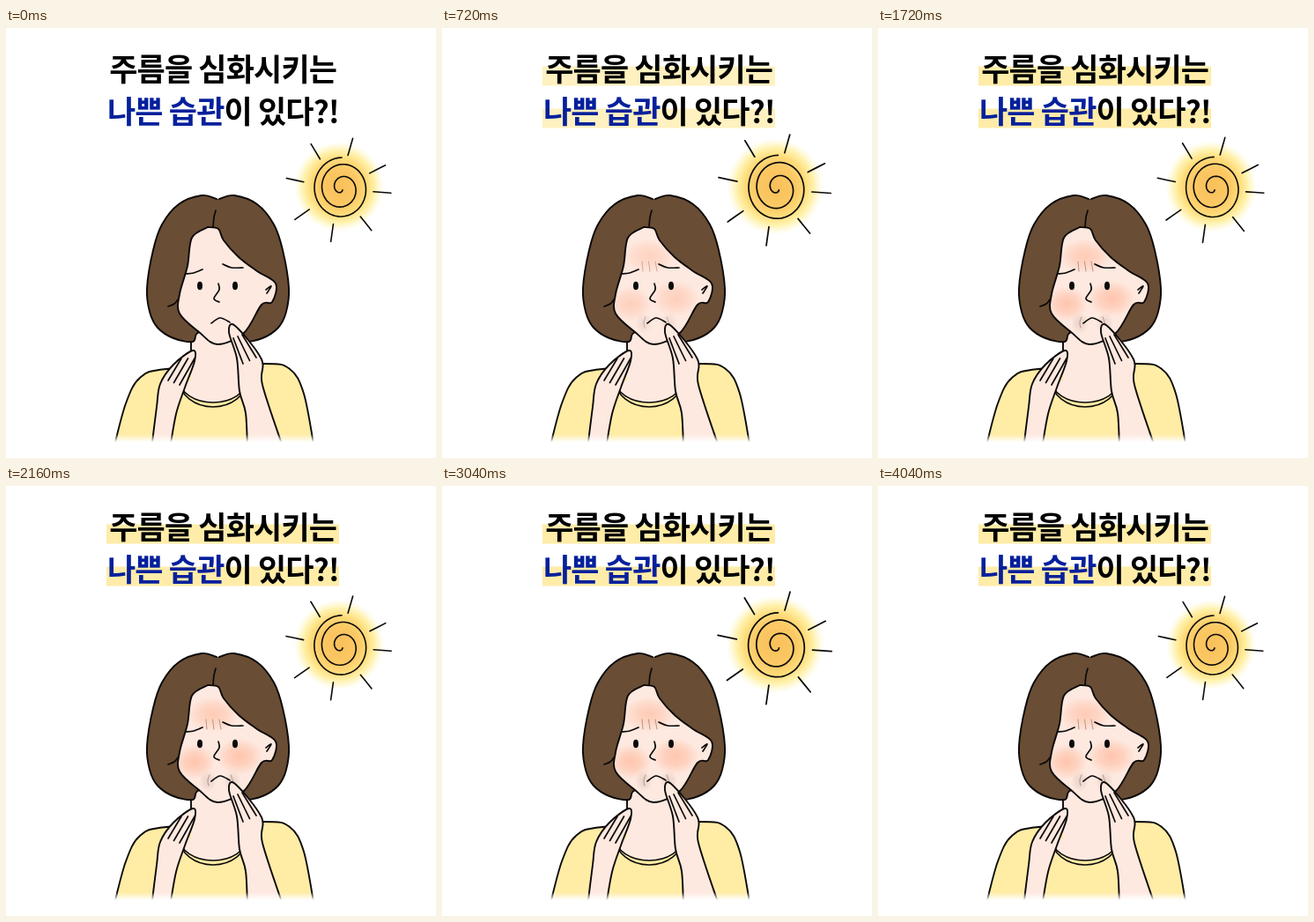
Write an HTML page with a canvas that moves like this. It is 488 by 488 pixels and loops after 5 s.

```html
<!DOCTYPE html>
<html lang="ko">
<head>
<meta charset="utf-8">
<style>
html, body { margin: 0; width: 100%; height: 100%; overflow: hidden; background: #fff; }
canvas { display: block; }
</style>
</head>
<body>
<canvas id="stage" width="488" height="488"></canvas>
<script>
const ctx = document.getElementById('stage').getContext('2d');
const SIZE = 488, LOOP = 5000, STEP = 40, FADE = 1000, PULSE = 2000, PULSE_END = 4000;
const INK = '#0b0909', SKIN = '#fee9e0', HAIR = '#694d34', SHIRT = '#ffeca5';
const FONT = 'bold 35px "Noto Sans CJK KR", "Noto Sans KR", "Noto Sans CJK SC", "Noto Sans CJK JP", sans-serif';

// Smooth path through points
function curve(...pts) {
  const path = new Path2D(), last = pts.length - 1;
  const at = i => pts[Math.max(0, Math.min(last, i))];
  path.moveTo(...pts[0]);
  for (let i = 0; i < last; i++) {
    const [a, b, c, d] = [at(i - 1), at(i), at(i + 1), at(i + 2)];
    path.bezierCurveTo(
      b[0] + (c[0] - a[0]) / 6, b[1] + (c[1] - a[1]) / 6,
      c[0] - (d[0] - b[0]) / 6, c[1] - (d[1] - b[1]) / 6, ...c);
  }
  return path;
}

function fill(path, color) {
  ctx.fillStyle = color;
  ctx.fill(path);
}

function stroke(path, width = 1.9, color = INK) {
  ctx.lineWidth = width;
  ctx.strokeStyle = color;
  ctx.stroke(path);
}

function shape(path, color) {
  fill(path, color);
  stroke(path);
}

function oval(x, y, rx, ry, end = 2 * Math.PI) {
  const path = new Path2D();
  path.ellipse(x, y, rx, ry, 0, 0, end);
  return path;
}

function glow(x, y, rx, ry, rgb, alpha) {
  ctx.save();
  ctx.translate(x, y);
  ctx.scale(rx, ry);
  const g = ctx.createRadialGradient(0, 0, 0, 0, 0, 1);
  g.addColorStop(0, `rgba(${rgb},${alpha})`);
  g.addColorStop(0.5, `rgba(${rgb},${alpha * 0.65})`);
  g.addColorStop(1, `rgba(${rgb},0)`);
  ctx.fillStyle = g;
  ctx.fillRect(-1, -1, 2, 2);
  ctx.restore();
}

const shirt = curve([122, 478], [136, 426], [152, 397], [182, 387],
  [291, 381], [322, 387], [338, 415], [350, 478]);
const leftHand = curve([165, 478], [171, 430], [175, 404], [190, 382], [212, 366],
  [214, 378], [203, 408], [193, 438], [186, 478]);
const rightHand = curve([274, 478], [272, 437], [265, 412], [262, 375], [253, 345],
  [260, 338], [290, 376], [291, 405], [315, 478]);
const face = curve([229, 226], [211, 238], [206, 270], [197, 302], [197, 324], [219, 345],
  [240, 359], [270, 346], [290, 314], [302, 311], [306, 290], [285, 276], [264, 260],
  [247, 241], [241, 228], [229, 226]);

// The bob is one half and its mirror image
const half = [[239, 194], [222, 190], [196, 200], [177, 223], [167, 252], [160, 295],
  [163, 322], [172, 340], [190, 352], [212, 356], [220, 345]];
const hair = curve(...half, ...half.map(([x, y]) => [481 - x, y]).reverse());

const features = [
  curve([204, 279], [213, 278], [223, 274]),
  curve([246, 268], [256, 272], [269, 272]),
  curve([241, 290], [242, 297], [236, 307], [242, 311]),
  curve([233, 335], [243, 329], [254, 334]),
  curve([295, 297], [301, 293], [296, 301]),
  curve([184, 316], [191, 313], [196, 307]),
  curve([238, 207], [236, 215], [235, 226])
];

const spiral = new Path2D();
for (let turn = 0; turn < 2.6; turn += 0.02) {
  const a = 2 * Math.PI * turn, r = 35 - 4.5 * turn - 3.2 * turn * turn;
  spiral.lineTo(381 - 0.92 * r * Math.sin(a), 182 - r * Math.cos(a));
}

function drawTitle(p) {
  ctx.fillStyle = `rgba(255,236,168,${p})`;
  for (const y of [43.5, 91.5]) ctx.fillRect(114, y, 264, 22);
  ctx.font = FONT;
  ctx.letterSpacing = '-0.85px';
  ctx.fillStyle = '#000';
  ctx.fillText('주름을 심화시키는', 117.2, 60.3);
  const key = '나쁜 습관', x = 115;
  ctx.fillText('이 있다?!', x + ctx.measureText(key).width, 108);
  ctx.fillStyle = '#06209c';
  ctx.fillText(key, x, 108);
}

function drawSun(scale) {
  ctx.save();
  ctx.translate(377, 183);
  ctx.scale(scale, scale);
  const g = ctx.createRadialGradient(1, -3, 0, 1, -3, 51);
  g.addColorStop(0, '#f9bf5a');
  g.addColorStop(0.42, '#fbc964');
  g.addColorStop(0.64, '#ffdd7c');
  g.addColorStop(0.8, 'rgba(255,238,152,.8)');
  g.addColorStop(1, 'rgba(255,246,190,0)');
  ctx.fillStyle = g;
  ctx.fillRect(-52, -56, 106, 106);
  for (let i = 0; i < 8; i++) {
    const a = (4 + 47 * i) * Math.PI / 180;
    const at = r => [r * Math.cos(a), r * Math.sin(a)];
    stroke(curve(at(40), at(60)), 1.6);
  }
  ctx.translate(-377, -183);
  stroke(spiral, 1.6);
  ctx.restore();
}

function drawWorry(p) {
  ctx.save();
  ctx.globalAlpha = p;
  ctx.clip(face);
  glow(235, 259, 30, 20, '255,178,146', 0.55);
  glow(214, 313, 24, 20, '255,178,146', 0.65);
  glow(265, 307, 27, 21, '255,178,146', 0.65);
  for (const side of [-1, 1]) {
    const x = 243 + 14 * side;
    glow(x, 335, 10, 12, '170,145,135', 0.25);
    stroke(curve([x - 2 * side, 328], [x, 334], [x - side, 340]), 0.9, '#a98d80');
  }
  for (let i = 0; i < 3; i++) {
    stroke(curve([227 + 7.5 * i, 265], [228 + 8 * i, 276]), 0.9, '#a98d80');
  }
  ctx.restore();
}

function drawHands() {
  shape(leftHand, SKIN);
  shape(rightHand, SKIN);
  for (let i = 0; i < 3; i++) {
    stroke(curve([214 - 7.5 * i, 375], [197 - 6.5 * i, 405 - 2.5 * i]), 1.7);
    stroke(curve([258 + 5 * i, 352 - 2 * i], [269 + 7.5 * i, 381 - 3.5 * i]), 1.7);
  }
}

function drawWoman(p) {
  shape(shirt, SHIRT);
  ctx.fillStyle = SKIN;
  ctx.fillRect(210, 340, 60, 61);
  fill(oval(235, 400, 38, 25, Math.PI), SKIN);
  for (const depth of [25, 30]) stroke(oval(235, 400, 38, depth, Math.PI), 1.6);
  stroke(curve([210, 352], [210, 370]));
  shape(hair, HAIR);
  fill(face, SKIN);
  drawWorry(p);
  stroke(face);
  features.forEach(f => stroke(f, 1.7));
  for (const x of [220, 260]) fill(oval(x, 292.5, 3, 4.8), INK);
  drawHands();

  const g = ctx.createLinearGradient(0, 461, 0, 470);
  g.addColorStop(0, 'rgba(255,255,255,0)');
  g.addColorStop(1, '#fff');
  ctx.fillStyle = g;
  ctx.fillRect(100, 461, 270, 27);
}

function draw(now) {
  const t = Math.floor((now % LOOP) / STEP) * STEP;
  const fade = Math.min(1, t / FADE);
  const swell = t < PULSE_END ? (1 - Math.cos(2 * Math.PI * t / PULSE)) / 2 : 0;
  ctx.fillStyle = '#fff';
  ctx.fillRect(0, 0, SIZE, SIZE);
  ctx.lineCap = ctx.lineJoin = 'round';
  drawTitle(fade);
  drawSun(1 + 0.09 * swell);
  drawWoman(fade);
}

const start = performance.now();
function tick() {
  draw(performance.now() - start);
  requestAnimationFrame(tick);
}
tick();
</script>
</body>
</html>
```
